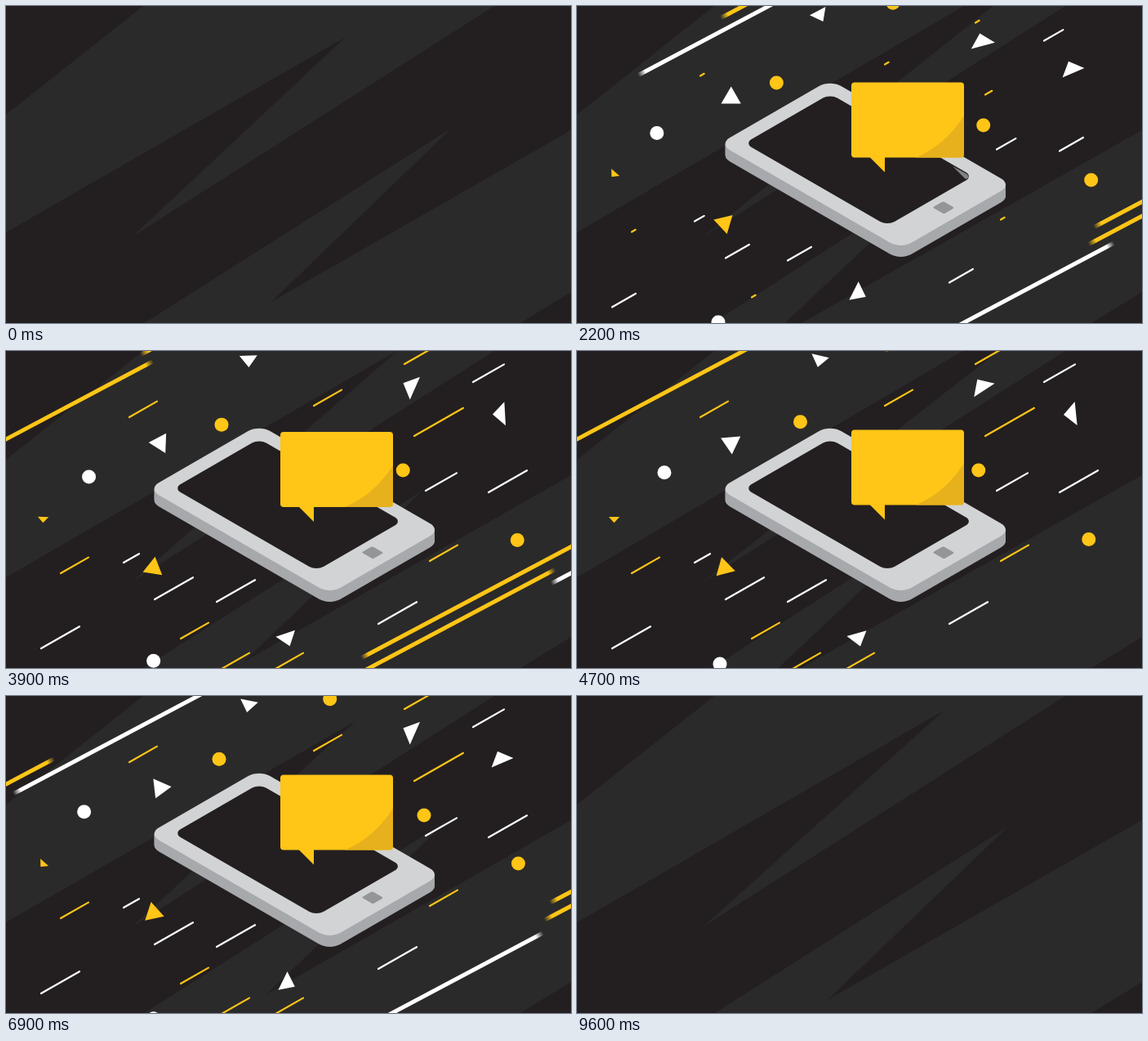
Recreate the animation shown at these times as an HTML page with a canvas. Size 692 px wide and 388 px high, loop 10 s.

```html
<!DOCTYPE html>
<html lang="en">
<head>
<meta charset="utf-8">
<title>Phone message</title>
<style>
html, body { margin: 0; width: 100%; height: 100%; overflow: hidden; background: #231f20; }
canvas { display: block; }
</style>
</head>
<body>
<canvas id="stage" width="692" height="388"></canvas>
<script>
const ctx = document.getElementById('stage').getContext('2d');
const DARK = '#231f20', BAND = '#2b2a2a', YELLOW = '#ffc517', WHITE = '#ffffff';
const LOOP = 10000, STEP = 100, SPEED = 0.33;
const START = 500, LAST = 9600;
const CENTER = { x: 354, y: 201 };

// Each streak passes again and again along its own lane
const streaks = [
  { color: WHITE, x: 0, y: 124.5, first: 673, run: 1300, every: 4900 },
  { color: YELLOW, x: 0, y: 108, first: -13, run: 1680, every: 3367 },
  { color: YELLOW, x: 0, y: 92, first: 350, run: 750, every: 2300 },
  { color: YELLOW, x: 412, y: 388, first: 400, run: 1130, every: 2300 },
  { color: YELLOW, x: 445, y: 388, first: 910, run: 740, every: 2300 },
  { color: WHITE, x: 473, y: 388, first: 1640, run: 1670, every: 4700 }
];

// Lower left ends, with a width where it is not the usual one
const dashGroups = [
  { color: WHITE, width: 47, from: 1680, ends: [[572, 37, 38], [514, 170, 38], [591, 172],
    [456, 333], [258, 306], [182, 303], [43, 363], [144, 258, 19]] },
  { color: YELLOW, width: 34, from: 1990, ends: [[488, 15], [377, 66], [500, 103, 60],
    [151, 80], [67, 271], [519, 256], [214, 351], [264, 388], [330, 388]] }
];

// r: long radius, q: short radius as a part of it, turn and swing in degrees
const triangles = [
  { color: WHITE, x: 297, y: 10.5, r: 12, q: 0.8, turn: 62, swing: 50, period: 7500 },
  { color: WHITE, x: 188.7, y: 112.5, r: 14, q: 1, turn: 30, swing: 85, period: 9000 },
  { color: WHITE, x: 496, y: 43.5, r: 16, q: 0.65, turn: 257, swing: -55, period: 3400 },
  { color: WHITE, x: 606, y: 77, r: 15.5, q: 0.65, turn: 248, swing: -78, period: 4700 },
  { color: YELLOW, x: 45.5, y: 205.5, r: 7.1, q: 0.67, turn: 132, swing: -44, period: 4700 },
  { color: YELLOW, x: 180.5, y: 265.5, r: 13.8, q: 1, turn: 317, swing: -75, period: 7500 },
  { color: WHITE, x: 344, y: 351, r: 13.7, q: 0.8, turn: 26, swing: 50, period: 4800 }
];

// Circles wander by dx and dy around their middle
const circles = [
  { color: YELLOW, x: 391, y: 18, dx: 13, dy: 27, peak: 8500, period: 9000 },
  { color: YELLOW, x: 260, y: 84, dx: 16, dy: -10, peak: 5300, period: 6667 },
  { color: YELLOW, x: 499, y: 146, dx: 13, dy: 0, peak: 6900, period: 6400 },
  { color: YELLOW, x: 628, y: 217, dx: 2, dy: 15, peak: 2500, period: 3400 },
  { color: WHITE, x: 100, y: 149, dx: 7, dy: 8, peak: 8150, period: 3500 },
  { color: WHITE, x: 177, y: 387, dx: -4, dy: 8, peak: 5200, period: 3000 }
];

const clamp = v => Math.max(0, Math.min(1, v));
const ramp = (t, from, length) => clamp((t - from) / length);
const smooth = p => p * p * (3 - 2 * p);
const swell = (t, period) => (1 - Math.cos(2 * Math.PI * t / period)) / 2;
const backIn = p => 2.7 * p ** 3 - 1.7 * p * p;
const popIn = (t, from) => 1 - backIn(1 - ramp(t, from, 500));
const popOut = (t, from) => 1 - backIn(ramp(t, from, 500));
const shrink = (t, end) => 1 - ramp(t, end - 500, 500);

function poly(color, points) {
  ctx.fillStyle = color;
  ctx.beginPath();
  for (let i = 0; i < points.length; i += 2) ctx.lineTo(points[i], points[i + 1]);
  ctx.fill();
}

function line(x1, y1, x2, y2) {
  ctx.beginPath();
  ctx.moveTo(x1, y1);
  ctx.lineTo(x2, y2);
  ctx.stroke();
}

function scaled(size, draw) {
  if (size <= 0) return;
  ctx.save();
  ctx.translate(475, 266);
  ctx.scale(size, size);
  ctx.translate(-475, -266);
  draw();
  ctx.restore();
}

function background(t) {
  const k = 6 * swell(t, LOOP / 3);
  ctx.fillStyle = DARK;
  ctx.fillRect(0, 0, 692, 388);
  poly(BAND, [0, 133, 421, -200, 912, -200, 155, 282, 416 + 42 * k, 38 - 25.5 * k, 0, 277]);
  poly(BAND, [-100, 559, 545 - 22 * k, 150 + 13 * k, 325 - 22 * k, 362 + 12 * k,
    692, 152, 692, 350, 300, 590]);
}

function drawStreaks(t) {
  ctx.lineWidth = 5;
  ctx.lineCap = 'butt';
  for (const { color, x, y, first, run, every } of streaks) {
    for (let time = first; time < 9000; time += every) {
      const head = Math.min(330, (t - Math.max(START, time)) * SPEED);
      const tail = Math.max(-30, (t - time - run) * SPEED);
      if (head <= 0 || tail >= head) continue;
      const ends = [tail, head].flatMap(d => [x + d, y - d * 0.53]);
      const fade = Math.min(0.5, 9 / (head - tail));
      const paint = ctx.createLinearGradient(...ends);
      paint.addColorStop(0, color + '00');
      paint.addColorStop(fade, color);
      paint.addColorStop(1 - fade, color);
      paint.addColorStop(1, color + '00');
      ctx.strokeStyle = paint;
      line(...ends);
    }
  }
}

function drawDashes(t) {
  const drop = 1 + 4.5 * (1 - smooth(ramp(t, 2200, 700)));
  ctx.lineWidth = 2.2;
  ctx.lineCap = 'round';
  for (const { color, width, from, ends } of dashGroups) {
    const head = smooth(ramp(t, from, 900)), tail = smooth(ramp(t, 7600, 700));
    if (head <= tail) continue;
    ctx.strokeStyle = color;
    for (const [x, y, w = width] of ends) {
      line(...[tail, head].flatMap(p => [x + w * p, y + drop - w * p * 0.57]));
    }
  }
}

function drawTriangles(t) {
  triangles.forEach(({ color, x, y, r, q, turn, swing, period }, i) => {
    // Those nearest to the phone leave last
    const away = Math.hypot(x - CENTER.x, y - CENTER.y);
    const size = r * popIn(t, 1000 + i * 90) * shrink(t, 8300 + 10 * Math.max(0, 212 - away));
    const spread = 90 + 30 * q;
    const angle = turn + swing * swell(t - 2000, period);
    const corner = (degrees, radius) => {
      const a = (angle + degrees) * Math.PI / 180;
      return [x + size * radius * Math.cos(a), y + size * radius * Math.sin(a)];
    };
    poly(color, [...corner(0, q), ...corner(spread, 1), ...corner(-spread, 1)]);
  });
}

function drawCircles(t) {
  circles.forEach(({ color, x, y, dx, dy, peak, period }, i) => {
    const a = 2 * Math.PI * (t - peak) / period;
    const size = popIn(t, 900 + i * 90) * shrink(t, 8750 + i * 60);
    ctx.fillStyle = color;
    ctx.beginPath();
    ctx.arc(x + dx * Math.cos(a), y + dy * Math.sin(a / 2), Math.max(0, 8.5 * size), 0, 7);
    ctx.fill();
  });
}

// Rounded rectangle on the isometric ground, placed by its top corner
function slab(x, y, w, h, r, color) {
  ctx.save();
  ctx.translate(x, y);
  ctx.transform(0.866, 0.5, -0.866, 0.5, 0, 0);
  ctx.fillStyle = color;
  ctx.beginPath();
  ctx.roundRect(0, 0, w, h, r);
  ctx.fill();
  ctx.restore();
}

function phone(t) {
  for (let d = 14; d > 0; d--) slab(310, 90.3 + d, 257, 157, 15, '#a7a9ac');
  slab(310, 90.3, 257, 157, 15, '#d1d3d4');
  slab(310, 107.5, 202, 121, 10, DARK);
  if (t < 2500 || t > 8300) poly('#808285', [460, 196, 478, 206, 480, 210, 476, 212]);
  slab(448.5, 239, 16, 15, 2, '#939598');
}

function bubble(t) {
  ctx.translate(0, 93 + 6 * swell(t - 1800, 4000));
  ctx.fillStyle = YELLOW;
  ctx.beginPath();
  ctx.roundRect(336, 0, 138, 92, 4);
  ctx.fill();
  poly(YELLOW, [358, 91, 377, 110, 377, 91]);
  ctx.fillStyle = '#e6b11c';
  ctx.beginPath();
  ctx.moveTo(415, 92);
  ctx.quadraticCurveTo(451, 77, 474, 41);
  ctx.lineTo(474, 88);
  ctx.quadraticCurveTo(474, 92, 470, 92);
  ctx.fill();
}

function frame(now) {
  const t = Math.min(LAST, Math.floor(now % LOOP / STEP) * STEP);
  background(t);
  drawStreaks(t);
  drawDashes(t);
  drawTriangles(t);
  drawCircles(t);
  scaled(popIn(t, 700) * popOut(t, 8310), () => phone(t));
  scaled(popIn(t, 1100) * popOut(t, 8332), () => bubble(t));
}

const begin = performance.now();
function tick() {
  frame(performance.now() - begin);
  requestAnimationFrame(tick);
}
tick();
</script>
</body>
</html>
```
